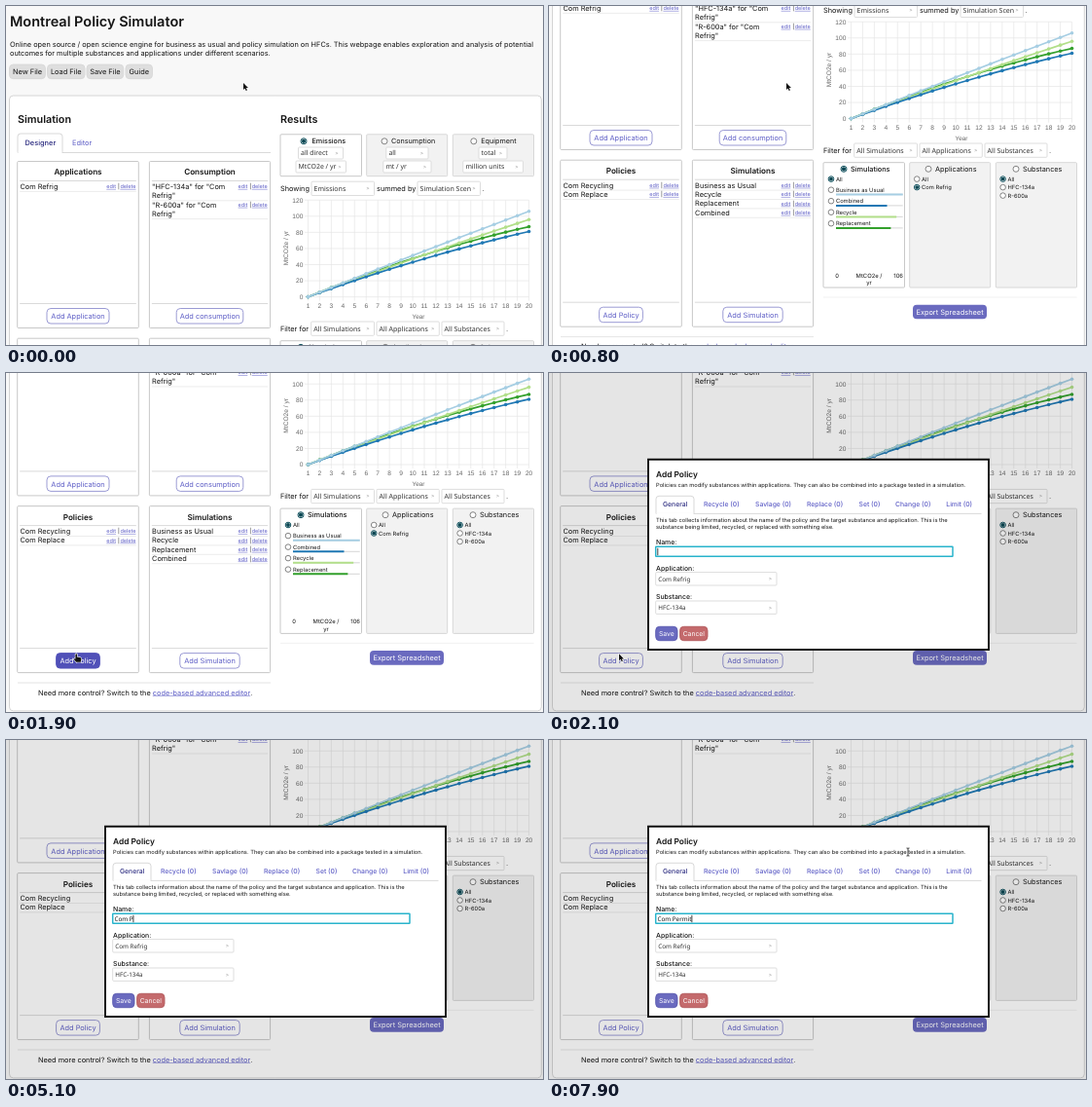
Write an HTML page with a canvas that moves like this. It is 552 by 348 pixels and loops after 8000 ms.

```html
<!DOCTYPE html>
<html lang="en">
<head>
<meta charset="utf-8">
<title>Policy Simulator</title>
<style>
html, body { margin: 0; width: 100%; height: 100%; overflow: hidden; background: #f8f8f8; }
canvas { display: block; width: 552px; height: 348px; }
</style>
</head>
<body>
<canvas id="stage"></canvas>
<script>
const W = 552, H = 348, LOOP = 8000;
const UI = 'Inter, sans-serif', FIELD = '"Noto Sans", sans-serif', PLOT = '"Liberation Sans", sans-serif';
const INK = '#151515', LINK = '#5e5ec6', PURPLE = '#6a6abf', EDGE = '#d0d0d0', CARD = '#c2c2c2';
const canvas = document.getElementById('stage');
const c = canvas.getContext('2d');
const dpr = window.devicePixelRatio || 1;
canvas.width = W * dpr;
canvas.height = H * dpr;
c.textRendering = 'geometricPrecision'; // even spacing at small sizes

// y is the middle of the capitals
function text(s, x, y, size = 7.35, o = {}) {
  c.font = `${o.weight || 400} ${size}px ${o.font || UI}`;
  c.textAlign = o.align || 'left';
  c.fillStyle = o.color || INK;
  c.fillText(s, x, y + size * 0.36);
  return c.measureText(s).width;
}

function line(x1, y1, x2, y2, color = EDGE, width = 0.8) {
  c.beginPath();
  c.moveTo(x1, y1);
  c.lineTo(x2, y2);
  c.strokeStyle = color;
  c.lineWidth = width;
  c.stroke();
}

function box(x1, y1, x2, y2, fill, stroke, r = 1, width = 0.9) {
  c.beginPath();
  c.roundRect(x1, y1, x2 - x1, y2 - y1, r);
  if (fill) { c.fillStyle = fill; c.fill(); }
  if (stroke) { c.strokeStyle = stroke; c.lineWidth = width; c.stroke(); }
}

function link(s, x, y, size) {
  const w = text(s, x, y, size, { color: LINK });
  const base = y + size * 0.36 + 1;
  line(x, base, x + w, base, LINK, 0.5);
}

function button(s, x1, y1, x2, y2, fill, stroke, color, size = 7.4) {
  box(x1, y1, x2, y2, fill, stroke, 4);
  text(s, (x1 + x2) / 2, (y1 + y2) / 2 + 0.2, size, { align: 'center', color });
}

function select(s, x1, y1, x2, y2, size = 7) {
  const y = (y1 + y2) / 2;
  box(x1, y1, x2, y2, '#fff', '#dadada', 1);
  text(s, x1 + 2.6, y, size, { font: FIELD, color: '#333' });
  text('>', x2 - 8, y, 5.2, { font: FIELD, color: '#888' });
}

function radio(x, y, on, r = 3) {
  c.beginPath();
  c.arc(x, y, r, 0, 7);
  c.fillStyle = '#fff';
  c.fill();
  c.strokeStyle = on ? '#0d4f5c' : '#666';
  c.lineWidth = on ? 1 : 0.8;
  c.stroke();
  if (!on) return;
  c.beginPath();
  c.arc(x, y, r * 0.7, 0, 7);
  c.fillStyle = '#0a4652';
  c.fill();
}

function tabLine(x1, x2, y, from, to, top) {
  line(x1, y, x2, y);
  c.beginPath();
  c.moveTo(from, y);
  c.lineTo(from, top + 3);
  c.arcTo(from, top, from + 3, top, 3);
  c.arcTo(to, top, to, top + 3, 3);
  c.lineTo(to, y);
  c.strokeStyle = EDGE;
  c.lineWidth = 0.8;
  c.stroke();
  line(from + 0.5, y, to - 0.5, y, '#fff', 1.6);
}

function card(title, x1, y, x2, rows, label, half, hover) {
  const mid = (x1 + x2) / 2;
  box(x1, y, x2, y + 171, '#fff', CARD);
  text(title, mid, y + 11, 8.15, { weight: 600, align: 'center' });
  line(x1 + 2.5, y + 20, x2 - 2.5, y + 20);
  let ry = y + 25.7;
  for (const row of rows) {
    const parts = row.split('\n');
    parts.forEach((p, i) => text(p, x1 + 2.7, ry + i * 9));
    link('edit', x2 - 33, ry + 0.1, 5.5);
    text('|', x2 - 21.4, ry + 0.1, 5.5);
    link('delete', x2 - 18.9, ry + 0.1, 5.5);
    ry += parts.length * 9.4;
    line(x1 + 2.5, ry - 4.2, x2 - 2.5, ry - 4.2, '#e4e4e4', 0.7);
  }
  line(x1 + 2.5, y + 146, x2 - 2.5, y + 146);
  button(label, mid - half, y + 151, mid + half, y + 166.5,
    hover ? '#5050b8' : '#fff', hover ? '#5050b8' : '#9090d0', hover ? '#fff' : LINK);
}

const COLS = [[282, 365.5], [370.7, 453.7], [459.3, 542.5]];

function panels(y1, y2) {
  COLS.forEach(([a, b], i) => box(a, y1, b, y2, i ? '#f2f2f2' : '#fff', i ? '#d4d4d4' : CARD));
}

function header() {
  text('Montreal Policy Simulator', 4, 15.5, 14.5, { weight: 600 });
  text('Online open source / open science engine for business as usual and policy simulation on HFCs. This webpage enables exploration and analysis of potential', 4, 39.6, 7.35);
  text('outcomes for multiple substances and applications under different scenarios.', 4, 48.3, 7.35);
  [['New File', 3.5, 40.5], ['Load File', 42.5, 81], ['Save File', 83, 120.7], ['Guide', 123, 150.5]]
    .forEach(([s, a, b]) => button(s, a, 60, b, 74.7, '#dedede', '#d8d8d8', INK));
}

function leftSide(hover) {
  text('Simulation', 12, 115.7, 10.8, { weight: 600 });
  tabLine(12, 272, 150.5, 12, 58, 131);
  text('Designer', 19.5, 140.6, 7.4, { weight: 500, color: '#2c2c80' });
  text('Editor', 68, 140.6, 7.4, { color: LINK });
  card('Applications', 11.7, 159.5, 136.3, ['Com Refrig'], 'Add Application', 32);
  card('Consumption', 147.4, 159.5, 271.6,
    ['"HFC-134a" for "Com\nRefrig"', '"R-600a" for "Com\nRefrig"'], 'Add consumption', 34.3);
  card('Policies', 11.7, 341.2, 136.3, ['Com Recycling', 'Com Replace'], 'Add Policy', 22.4, hover);
  card('Simulations', 147.4, 341.2, 271.6,
    ['Business as Usual', 'Recycle', 'Replacement', 'Combined'], 'Add Simulation', 30.7);
  line(12, 522.6, 272, 522.6, '#ddd');
  const w = text('Need more control? Switch to the ', 33, 532.5);
  link('code-based advanced editor', 33 + w, 532.5, 7.35);
  const w2 = c.measureText('code-based advanced editor').width;
  text('.', 33 + w + w2, 532.5);
}

// total after n years: a*n - b*n*n
const SERIES = [
  { name: 'Business as Usual', color: '#a6cee3', a: 5.8, b: 0.0116, end: 106 },
  { name: 'Combined', color: '#1f78b4', a: 5.24, b: 0.0514, end: 81 },
  { name: 'Recycle', color: '#b2df8a', a: 5.37, b: 0.017, end: 96 },
  { name: 'Replacement', color: '#33a02c', a: 5.91, b: 0.07, end: 87 }
];

function chart() {
  const X = n => 310.5 + n * 11.95, Y = v => 298.6 - v * 0.828;
  const tick = { font: PLOT, color: '#666' };
  for (let v = 0; v <= 120; v += 20) {
    line(307, Y(v), X(19), Y(v), '#e6e6e6', 0.7);
    text(String(v), 305.3, Y(v), 6.6, { ...tick, align: 'right' });
  }
  for (let n = 0; n < 20; n++) {
    line(X(n), Y(120), X(n), Y(0) + 4, '#e6e6e6', 0.7);
    text(String(n + 1), X(n), 307.2, 6.6, { ...tick, align: 'center' });
  }
  text('Year', 424, 318.3, 6.4, { ...tick, align: 'center' });
  c.save();
  c.translate(287.3, 248.5);
  c.rotate(-Math.PI / 2);
  text('MtCO2e / yr', 0, 0, 6.6, { ...tick, align: 'center' });
  c.restore();
  for (const s of [...SERIES].reverse()) {
    const at = n => Y(s.a * n - s.b * n * n);
    c.beginPath();
    for (let n = 0; n < 20; n++) c.lineTo(X(n), at(n));
    c.strokeStyle = c.fillStyle = s.color;
    c.lineWidth = 1.7;
    c.stroke();
    for (let n = 0; n < 20; n++) {
      c.beginPath();
      c.arc(X(n), at(n), 1.8, 0, 7);
      c.fill();
    }
  }
}

function filters() {
  text('Filter for', 282, 331.2);
  select('All Simulations', 313.7, 324, 378.5, 338.3);
  select('All Applications', 381, 324, 445.3, 338.3);
  select('All Substances', 448, 324, 512, 338.3);
  text('.', 514, 331.2);
  panels(343.7, 472);
  [['Simulations', 303], ['Applications', 390], ['Substances', 480]].forEach(([s, x], i) => {
    radio(x, 350.3, !i);
    text(s, x + 7, 350.3, 7.3, { weight: i ? 400 : 500 });
  });
  const item = (s, x, y, on) => {
    radio(x, y, on, 2.8);
    text(s, x + 4.9, y, 5.8);
  };
  item('All', 290, 360.6, true);
  SERIES.forEach((s, i) => {
    const y = 371.7 + i * 11.5;
    item(s.name, 290, y, false);
    line(295, y + 4.7, 363.7, y + 4.7, '#ccc', 0.8);
    line(295, y + 4.7, 295 + s.end * 0.648, y + 4.7, s.color, 2);
  });
  text('0', 296.2, 459.8, 5.9, { align: 'center' });
  text('MtCO2e /', 329, 459.8, 5.9, { align: 'center' });
  text('yr', 329, 467, 5.9, { align: 'center' });
  text('106', 364, 459.8, 5.9, { align: 'right' });
  ['All', 'Com Refrig'].forEach((s, i) => item(s, 378.2, 360.6 + i * 8.5, i === 1));
  ['All', 'HFC-134a', 'R-600a'].forEach((s, i) => item(s, 466.6, 360.6 + i * 8.5, i === 0));
  line(282, 482, 542.5, 482, '#eee');
  button('Export Spreadsheet', 374, 489.7, 450, 504.3, PURPLE, null, '#fff');
}

function rightSide() {
  text('Results', 282, 115.7, 10.8, { weight: 600 });
  panels(131.8, 174.7);
  [['Emissions', 306, 314.5], ['Consumption', 389, 396], ['Equipment', 480.8, 488.3]].forEach(([s, x, tx], i) => {
    radio(x, 138.8, !i);
    text(s, tx, 138.8, 7.2, { weight: i ? 400 : 500 });
  });
  [['all direct', 300.5, 346.5], ['all', 390.8, 434], ['total', 486, 515]]
    .forEach(([s, a, b]) => select(s, a, 145, b, 157, 6.9));
  [['MtCO2e / yr', 298, 349.5], ['mt / yr', 387.8, 437], ['million units', 469.8, 531.5]]
    .forEach(([s, a, b]) => select(s, a, 159, b, 171, 6.9));
  text('Showing', 282, 187.3);
  select('Emissions', 314, 180.2, 378.5, 194.5);
  text('summed by', 381, 187.3);
  select('Simulation Scen', 423, 180.2, 487.5, 194.5);
  text('.', 489.5, 187.3);
  chart();
  filters();
}

function dialog(name, caret) {
  c.fillStyle = 'rgba(0,0,0,.1)';
  c.fillRect(0, 0, W, H);
  box(102, 88.8, 452, 284, '#fff', '#111', 0, 1.9);
  text('Add Policy', 110, 104, 8.4, { weight: 600 });
  text('Policies can modify substances within applications. They can also be combined into a package tested in a simulation.', 110, 115, 5.75);
  tabLine(110, 444.5, 144.4, 110, 149, 126.3);
  [['General', 117], ['Recycle (0)', 159], ['Savlage (0)', 212], ['Replace (0)', 265],
    ['Set (0)', 318.5], ['Change (0)', 356], ['Limit (0)', 408.3]].forEach(([s, x], i) =>
    text(s, x, 134.8, 6.8, { weight: 500, color: i ? LINK : '#2c2c80' }));
  text('This tab collects information about the name of the policy and the target substance and application. This is the', 110, 151.4, 5.75);
  text('substance being limited, recycled, or replaced with something else.', 110, 158.3, 5.75);
  [['Name:', 173.8], ['Application:', 200.7], ['Substance:', 230]]
    .forEach(([s, y]) => text(s, 110, y, 6.9, { weight: 500 }));
  box(109.7, 178.3, 415, 188.3, '#fff', '#2ab4cc', 0.5, 1.5);
  const w = text(name, 111.5, 183.5, 6.3, { font: FIELD });
  if (caret) line(111.8 + w, 179.8, 111.8 + w, 187.2, '#111', 0.8);
  select('Com Refrig', 109.7, 204.6, 234, 218, 6.3);
  select('HFC-134a', 109.7, 234, 234, 247.4, 6.3);
  button('Save', 109.7, 260.3, 132, 274.7, PURPLE, '#5c5cb0', '#fff', 6.8);
  button('Cancel', 134.6, 260.3, 163, 274.7, '#c46a6c', '#b45c5e', '#fff', 6.8);
}

const CURSORS = {
  arrow: 'M0 0V6.9L1.6 5.5L2.7 7.9L3.9 7.4L2.8 5.1H5Z',
  hand: 'M-.6 .4Q.3 -.6 1 .4V3.2L4.6 3.9Q5.6 4.2 5.4 5.4L4.8 8.4H.2L-2.2 5.6Q-2 4.4 -.6 5.2Z',
  beam: 'M-1.5 -4H-.3L0 -3.5L.3 -4H1.5M0 -3.5V3.5M-1.5 4H-.3L0 3.5L.3 4H1.5'
};

function cursor(kind, [x, y]) {
  const path = new Path2D(CURSORS[kind]);
  c.save();
  c.translate(x, y);
  c.lineJoin = 'round';
  c.strokeStyle = kind === 'beam' ? '#111' : '#fff';
  c.lineWidth = kind === 'beam' ? 0.8 : 1.2;
  c.stroke(path);
  if (kind !== 'beam') { c.fillStyle = '#111'; c.fill(path); }
  c.restore();
}

const SCROLL = [0, 18, 72.3, 135, 183, 199, 204.6];
const KEYS = [4200, 4400, 4500, 4600, 5100, 5300, 5400, 5500, 5600, 5800];
const EXIT = [[120, 231], [190, 172], [268, 129], [333, 107.5], [369, 115]];

function pointer(t) {
  if (t >= 7500) return EXIT[Math.min(4, (t - 7500) / 100)];
  const p = Math.min(1, Math.max(0, (t - 1100) / 800));
  const e = p * p * (3 - 2 * p);
  return [244 - 172 * e, 79 + 209.3 * e];
}

function draw(time) {
  const t = Math.floor(time / 100) * 100;
  const scroll = SCROLL[Math.min(6, Math.max(0, (t - 400) / 100))];
  const open = t >= 2100;
  const pos = pointer(t);
  const hover = !open && t >= 1200 && pos[0] > 51.5 && pos[0] < 96.5 && pos[1] > 287.4 && pos[1] < 303;

  c.setTransform(dpr, 0, 0, dpr, 0, 0);
  c.fillStyle = '#f8f8f8';
  c.fillRect(0, 0, W, H);
  c.save();
  c.translate(0, -scroll);
  header();
  box(3.5, 92, 550.3, 551.5, '#fff', EDGE, 4);
  leftSide(hover);
  rightSide();
  c.restore();

  if (open) {
    const typed = KEYS.filter(k => k <= t).length;
    const caret = t < 3400 || (t >= 4200 && t < 7000) || t >= 7500;
    dialog('Com Permit'.slice(0, typed), caret);
  }
  if (t < 4200) cursor(hover ? 'hand' : 'arrow', pos);
  else if (t >= 7500) cursor(t === 7500 || t === 7900 ? 'beam' : 'arrow', pos);
}

const start = performance.now();
function tick() {
  draw((performance.now() - start) % LOOP);
  requestAnimationFrame(tick);
}
tick();
</script>
</body>
</html>
```
